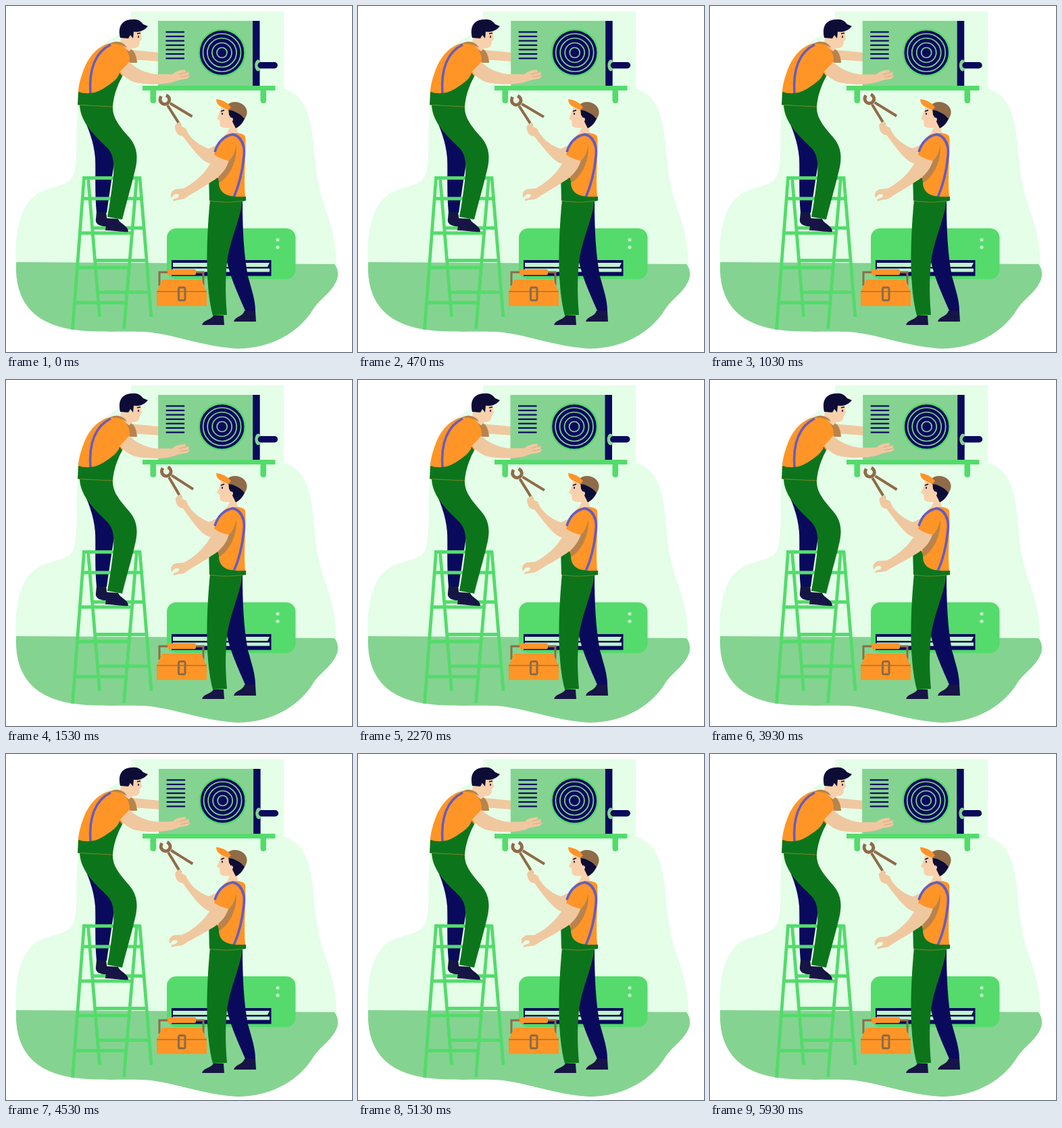
These frames come from a looping animation (512x512 px, 5970 ms). An HTML page:

```html
<!DOCTYPE html>
<html lang="en">
<head>
<meta charset="utf-8">
<title>Air conditioner repair</title>
<style>
  html, body { margin: 0; width: 100%; height: 100%; overflow: hidden; background: #fff; }
  svg { display: block; width: 100%; height: 100%; }
  .mint { fill: #e4fee8 }
  .sage { fill: #85d391 }
  .lime { fill: #54db6b }
  .navy { fill: #0a0a5c }
  .ink { fill: #161545 }
  .hair { fill: #0c0c36 }
  .green { fill: #0c751b }
  .orange { fill: #ff9527 }
  .tan { fill: #b8834c }
  .brown { fill: #8f6b47 }
  .face { fill: #f8d0ac }
  .skin { fill: #f0c8a0 }
  .line { fill: none; stroke-linecap: butt }
  .strap { stroke: #685bc0; stroke-width: 3.6 }
  .ladder { stroke: #54db6b; stroke-width: 4.8 }
  .tool { stroke: #8f6b47; stroke-width: 4 }
</style>
</head>
<body>
<svg viewBox="0 0 512 512">
  <!-- room -->
  <path class="mint" d="M185 8H411V122C440 131 450 158 454 195C458 240 461 268 472 298C483 328 489 355 489 388L15 386C12 335 20 296 45 279C66 264 97 270 101 245C107 222 102 195 106 155C109 105 126 50 185 37Z"/>
  <path class="sage" d="M15 379L486 382C492 389 493 400 488 409C480 425 464 434 455 448C436 480 396 507 342 507C294 504 258 489 215 483C170 479 108 488 66 470C28 454 13 422 15 379Z"/>

  <!-- indoor unit -->
  <rect class="lime" x="238" y="329" width="190.500" height="75" rx="14"/>
  <g fill="#bff5ca"><circle cx="402" cy="346" r="2.600"/><circle cx="402" cy="357" r="2.600"/></g>
  <rect class="navy" x="245" y="376" width="147.500" height="23.500"/>
  <path fill="#bff5ca" d="M247 380H390L387 386H247ZM247 388.500H390V393.500H247Z"/>

  <!-- toolbox -->
  <path class="line" stroke="#8f6b47" stroke-width="3" d="M227 414V394H292V414"/>
  <path class="orange" d="M231 405H289L297 423V444H223V423Z"/>
  <rect x="239" y="389.500" width="42" height="8.500" rx="2" class="orange"/>
  <path class="line" stroke="#a86f3c" stroke-width="1.500" d="M223 422.500H297"/>
  <rect x="255.500" y="416.500" width="9.500" height="19" rx="2" class="line" stroke="#8f6b47" stroke-width="3"/>

  <!-- far arm of the upper worker -->
  <path class="skin" d="M186 65L228 69V82L186 79Z"/>

  <!-- outdoor unit -->
  <g id="unit">
    <rect class="sage" x="225" y="22" width="141" height="97"/>
    <rect class="navy" x="365" y="22" width="10.500" height="97"/>
    <ellipse class="sage" cx="373" cy="88" rx="4.800" ry="8.500"/>
    <rect class="navy" x="372.500" y="83" width="29.500" height="9.500" rx="4.700"/>
    <g id="vents" class="line" stroke="#0a0a5c" stroke-width="2.200" stroke-linecap="round"></g>
    <circle cx="319.500" cy="69" r="34" class="navy" stroke="#54db6b" stroke-width="2.500"/>
    <g id="rings" class="line" stroke="#85d391" stroke-width="1.700"></g>
  </g>
  <path class="lime" d="M202 118H398.500V125H385V140Q385 144 381 144Q376.500 144 376.500 140V125H222V140Q222 144 218 144Q213.500 144 213.500 140V125H202Z"/>

  <!-- upper worker, far leg behind the ladder -->
  <path class="navy" d="M112 160C121 178 130 200 132 225C133 250 131 275 134 306H149L155 265L162 220L140 180Z"/>
  <path class="line ladder" d="M113 254.500H200M115.500 254L98.500 479M121.500 254L138.500 460M193.500 254L174.500 478M198 254L215 460M112 285H201M110 336H187M106 387H183M101 439H178M128 328.500H203M132 376.500H207M136 423.500H212"/>

  <!-- upper worker -->
  <path class="ink" d="M134 305H148L151 326H145C135 325 132 320 133 315Z"/>
  <path class="ink" d="M149 314L166 315C168 322 181 325 181 334C171 335 158 332 147 332Z"/>
  <path class="green" d="M109 146L158 148C157 167 171 181 182 194C195 209 196 225 190 247C184 272 177 295 172 316L150 312C154 290 157 270 159 250C160 231 159 220 150 210C134 194 110 174 109 146Z"/>
  <path class="tan" d="M176 62C187 61 193 69 194 84L183 84L176 76Z"/>
  <path class="face" d="M172 42L199 37C199 42 201 46 201 49L198 52C198 59 195 63 188 62L182 67L168 57Z"/>
  <path class="orange" d="M158 54C139 57 124 71 115 94C108 112 106 126 107 135H158C160 123 166 113 172 104C180 95 186 83 181 70C177 59 168 54 158 54Z"/>
  <path class="tan" d="M154 56C160 50 175 52 179 62C171 57 163 55 154 56Z"/>
  <path class="line strap" d="M155 57C135 67 122 88 125 130"/>
  <path class="hair" d="M169 47C165 30 172 20 187 20C197 19 200 24 203 27L210 30C204 37 197 39 189 38L188 48L184 43L181 48Z"/>
  <path class="line" stroke="#0c0c36" stroke-width="1.600" d="M194 41L199 40M196 44V47"/>
  <path class="green" d="M107 127C123 132 135 128 146 121C157 114 166 107 168 99L172 104C164 119 159 134 158 149L106 146Z"/>
  <path class="line" stroke="#7d8424" d="M107 146.500L158 149"/>
  <g id="upperArm">
    <path class="skin" d="M165 88L180 80C190 92 206 99 222 101L246 101C252 95 260 95 266 94L265 97L271 98L270 101L272 104L269 107C262 109 255 109 249 112C233 117 205 117 188 112C175 106 167 98 165 88Z"/>
    <path class="line" stroke="#d9a77e" d="M256 101L269 98M258 105L270 103"/>
  </g>
  <path class="orange" d="M168 58C178 62 184 72 182 83L167 99C161 90 160 72 168 58Z"/>

  <!-- lower worker -->
  <path class="navy" d="M322 340L350 288C350 332 352 368 358 400C364 421 369 436 369 451H354C343 425 333 405 326 375Z"/>
  <path class="ink" d="M353 451H369L370 467H337C339 459 350 460 353 451Z"/>
  <path class="ink" d="M307 458H322L323 472H290C292 464 303 465 307 458Z"/>
  <path class="green" d="M302 286H350C347 317 331 345 327 380C324 408 325 432 327 457L306 458C296 420 295 360 302 286Z"/>
  <g id="toolArm">
    <path class="line tool" d="M239 147L258 177M243 144L275.500 163.500"/>
    <path class="line" stroke="#8f6b47" stroke-width="4.800" d="M229.500 133.500C225 142 233 148 239 144C243 141 243 135 237 132"/>
    <path class="skin" d="M250 180C249 175 253 175 257 171L260 178L266 181C269 191 282 205 300 211L316 204L303 233C292 233 277 213 261 192C255 192 251 188 250 180Z"/>
  </g>
  <path class="face" d="M318 150L331 152L334 165L341 178L344 191H326L331 180C326 181 319 181 317 177L316 169L312 167C314 162 317 157 318 150Z"/>
  <path class="orange" d="M326 190C339 187 350 187 354 193C356 220 351 250 354 283H315L313 240L308 221C312 207 318 195 326 190Z"/>
  <path class="tan" d="M340 203C344 225 333 251 315 262L314 245L329 224Z"/>
  <path class="line strap" stroke-width="4" d="M335 190C347 192 354 204 352 222C350 245 345 265 337 283"/>
  <path class="green" d="M300 250C309 247 315 251 315 262C316 277 326 284 355 282V288C339 292 320 291 301 288Z"/>
  <path class="line" stroke="#7d8424" d="M302 288.500Q326 292 350 288.500"/>
  <g id="frontArm">
    <path class="skin" d="M309 217L331 224C328 240 318 252 304 260C290 270 275 277 266 284C260 288 253 286 248 289L247 286L255 283L256 279C249 277 248 280 245 284C242 279 245 273 251 271L263 270C278 262 292 250 301 235Z"/>
  </g>
  <path class="orange" d="M327 190C317 198 310 211 308 220C315 225 323 228 330 229C338 221 342 208 340 197Z"/>
  <path class="line strap" d="M309 216C313 202 322 193 335 190C343 191 349 198 351 207"/>
  <path class="hair" d="M329 151L354 164C352 172 346 178 340 181L335 171L333 166L330 161Z"/>
  <circle class="face" cx="333" cy="168" r="3"/>
  <path class="brown" d="M327 147C333 140 345 141 352 147C358 153 358 160 353 167C346 159 338 154 328 154Z"/>
  <path class="orange" d="M311 138C318 138 328 142 333 150L329 154C320 149 312 149 311 138Z"/>
  <path class="line" stroke="#0c0c36" stroke-width="1.600" d="M318 156L323 154M320 158V161"/>
</svg>
<script>
const LOOP = 5970;
const find = id => document.getElementById(id);

find("vents").innerHTML = Array.from({ length: 7 }, (_, i) =>
  `<path d="M236.500 ${38.5 + 6.5 * i}H264"/>`).join("");
find("rings").innerHTML = [28, 21.5, 14.5, 7.5].map(r =>
  `<circle cx="319.500" cy="69" r="${r}"/>`).join("");

// Poses in degrees, eased between the given times.
const times = [0, 470, 1530, 2970, 3930, 5130, LOOP];
const joints = [
  { part: find("toolArm"), pivot: "335 212", pose: [0, -0.6, 1.8, -0.9, 1.2, 0.6, 0] },
  { part: find("frontArm"), pivot: "330 215", pose: [0, 0.1, -0.2, 1.7, 2.3, 1.9, 0] },
  { part: find("upperArm"), pivot: "168 82", pose: [0, 0, 0.3, -0.4, -0.8, -0.6, 0] }
];

function poseAt(pose, t) {
  const i = times.findIndex(end => t < end) - 1;
  const k = (t - times[i]) / (times[i + 1] - times[i]);
  return pose[i] + (pose[i + 1] - pose[i]) * (1 - Math.cos(Math.PI * k)) / 2;
}

function draw(t) {
  const hum = 0.6 - 0.6 * Math.cos(2 * Math.PI * 19 * t / LOOP);
  find("unit").setAttribute("transform", `translate(${hum} 0)`);
  for (const { part, pivot, pose } of joints)
    part.setAttribute("transform", `rotate(${poseAt(pose, t)} ${pivot})`);
}

function tick() {
  draw(performance.now() % LOOP);
  requestAnimationFrame(tick);
}
tick();
</script>
</body>
</html>
```
